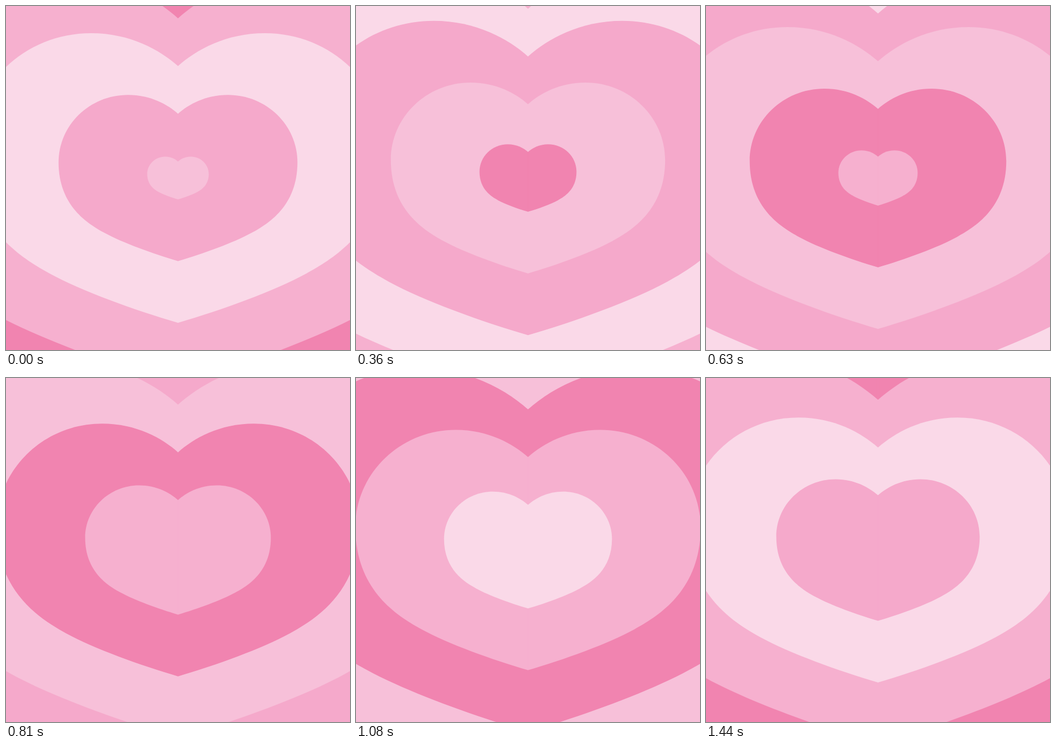
Recreate the animation shown at these times as an HTML page with a canvas. Size 620 by 620 pixels, loop 1530 ms.

```html
<!DOCTYPE html>
<html lang="en">
<head>
<meta charset="utf-8">
<title>Heart tunnel</title>
<style>
  html, body { margin: 0; overflow: hidden; }
  canvas { display: block; }
</style>
</head>
<body>
<canvas id="stage" width="620" height="620"></canvas>
<script>
const SIZE = 620, LOOP = 1530, STEP = 90;
const SPAWN = 300;        // ms between new hearts
const FIRST_SCALE = 0.347;
const LAYERS = 6;
const COLORS = ['#f7c0d9', '#f184b0', '#f6b0cf', '#fad9e8', '#f5a9cb'];

const ctx = document.getElementById('stage').getContext('2d');

// Right half of a heart around (0, 0), from notch to tip
const half = new Path2D(`M0-86 C14-98.4 36.8-111.2 66.8-111.2
  C118.2-111.2 159.8-70.8 159.8-21 C159.8 37.5 120.5 61.3 98.5 73.4
  C74.5 86.6 33 101.6 0 111.2Z`);
const heart = new Path2D(half);
heart.addPath(half, new DOMMatrix([-1, 0, 0, 1, 0, 0]));
// Covers the seam between the halves
heart.rect(-0.5, -85.5, 1, 196.4);
heart.rect(0.5, -85.5, -1, 196.4);

function fillHeart(scale, color) {
  ctx.setTransform(scale, 0, 0, scale, SIZE / 2, SIZE / 2);
  ctx.fillStyle = color;
  ctx.fill(half);
  ctx.scale(-1, 1);
  ctx.fill(half);
  ctx.fillRect(-0.5, -85.5, 1, 196.4);
}

function draw(ms) {
  const time = Math.floor(ms % LOOP / STEP) * STEP;
  const age = time / SPAWN;
  const newest = Math.floor(age);
  for (let i = newest - LAYERS + 1; i <= newest; i++) {
    const color = COLORS[(i + 2 * COLORS.length) % COLORS.length];
    fillHeart(FIRST_SCALE + age - i, color);
  }
}

const start = performance.now();
function tick() {
  draw(performance.now() - start);
  requestAnimationFrame(tick);
}
tick();
</script>
</body>
</html>
```
